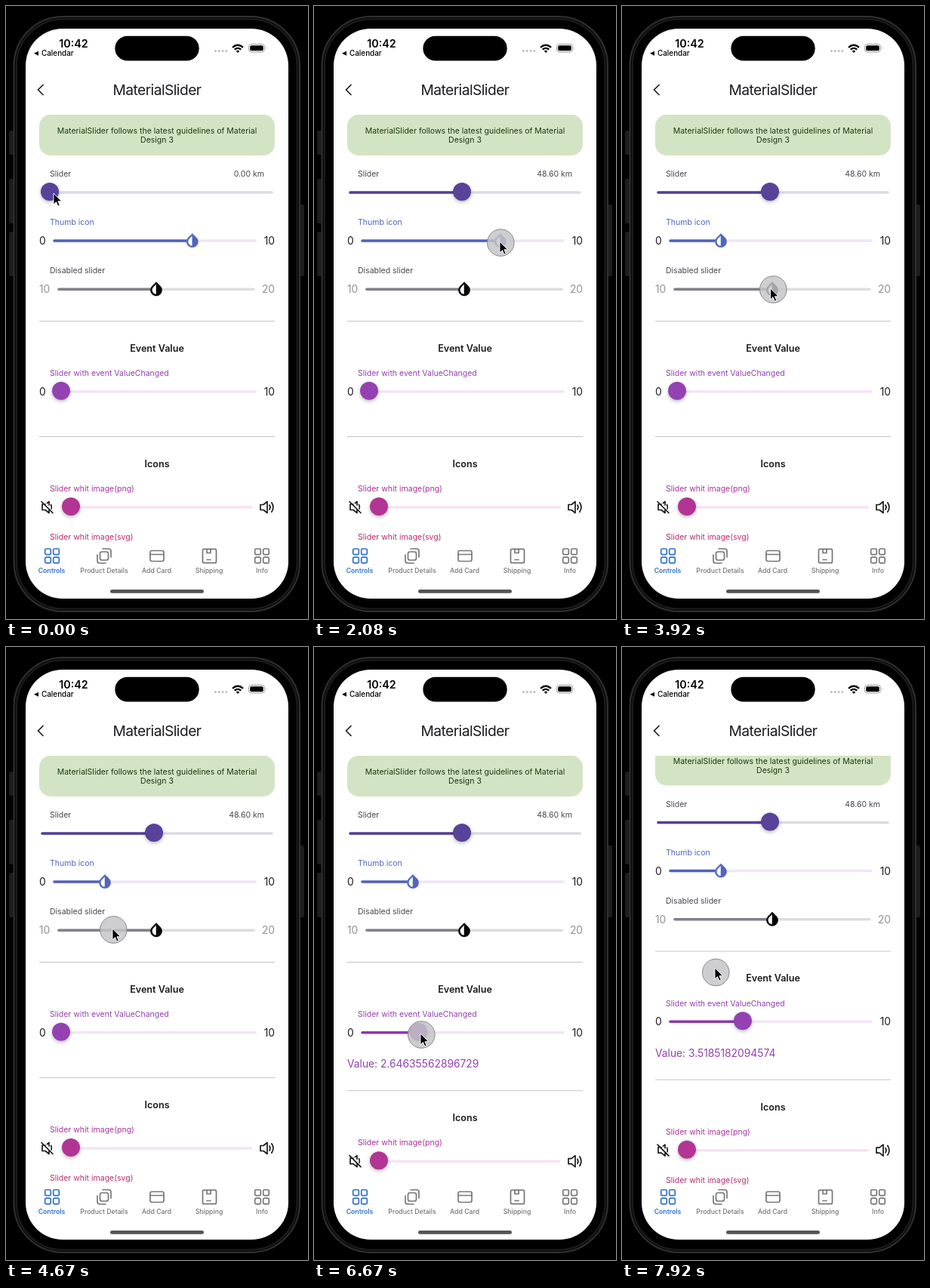
Recreate the animation shown at these times as an HTML page. Size 400 by 812 pixels, loop 8 s.

```html
<!DOCTYPE html>
<html lang="en">
<head>
<meta charset="utf-8">
<title>Slider demo</title>
<style>
  html, body { margin: 0; width: 100%; height: 100%; overflow: hidden; background: #000; }
  svg { display: block; width: 100vw; height: 100vh; font-family: Inter, Roboto, sans-serif; }
  .label { font-size: 10.5px; fill: #49454f; }
  .num { font-size: 13.8px; fill: #1d1b20; }
  .section { font-size: 12.6px; font-weight: 600; fill: #1a1a1a; }
  .tab { font-size: 8.7px; font-weight: 500; fill: #757575; }
  .mid { text-anchor: middle; }
  .end { text-anchor: end; }
  .track { stroke-width: 3.6; stroke-linecap: round; }
  .knob { filter: drop-shadow(0 2px 2.5px #0004); }
  .line { fill: none; stroke-width: 1.7; stroke-linejoin: round; stroke-linecap: round; }
  .rule { stroke: #c6c5c8; }
</style>
</head>
<body>
<svg viewBox="0 0 400 812">
  <defs>
    <clipPath id="view"><rect x="26" y="144" width="348" height="568"/></clipPath>
    <g id="grid">
      <rect x="-9.3" y="-9.5" width="7.6" height="7.6" rx="1.6"/>
      <rect x="1.7" y="-9.5" width="7.6" height="7.6" rx="1.6"/>
      <rect x="-9.3" y="1.7" width="7.6" height="7.6" rx="1.6"/>
      <rect x="1.7" y="1.7" width="7.6" height="7.6" rx="1.6"/>
    </g>
    <g id="drop" transform="scale(.95) translate(-12 -12.4)">
      <path d="M12 2.3 6.3 7.9a8 8 0 1 0 11.4 0Z" fill="#fff"/>
      <path fill="currentColor" stroke="currentColor" stroke-width=".5" d="M17.66 7.93 12 2.27 6.34 7.93c-3.12 3.12-3.12 8.19 0 11.31C7.9 20.8 9.95 21.58 12 21.58s4.1-.78 5.66-2.34c3.12-3.12 3.12-8.19 0-11.31zM12 19.59c-1.6 0-3.11-.62-4.24-1.76a6 6 0 0 1 0-8.48L12 5.1z"/>
    </g>
  </defs>

  <!-- phone body -->
  <g fill="#1d1d1e">
    <rect x="4" y="165" width="8" height="32" rx="2"/>
    <rect x="4" y="229" width="8" height="59" rx="2"/>
    <rect x="4" y="299" width="8" height="59" rx="2"/>
    <rect x="388" y="263" width="7" height="95" rx="2"/>
  </g>
  <rect x="10.5" y="14" width="378.5" height="788" rx="65" fill="#0b0b0b" stroke="#303031" stroke-width="2"/>
  <rect x="14" y="17.5" width="371.5" height="781" rx="61.5" fill="#000" stroke="#1c1c1d" stroke-width="2"/>
  <rect x="26" y="30" width="348" height="755" rx="49" fill="#fff"/>

  <!-- scrolling page -->
  <g clip-path="url(#view)">
    <g id="page">
      <rect x="44" y="144" width="312" height="54" rx="15" fill="#d3e4c5"/>
      <g class="label mid" style="fill:#1b3a0c">
        <text x="200" y="169">MaterialSlider follows the latest guidelines of Material</text>
        <text x="200" y="181">Design 3</text>
      </g>

      <text class="label" x="58" y="226">Slider</text>
      <text class="label end" x="342" y="226" id="distance"></text>
      <g id="plain"></g>

      <text class="label" x="58" y="290" style="fill:#5163b8">Thumb icon</text>
      <text class="num" x="44" y="316">0</text>
      <text class="num end" x="356" y="316">10</text>
      <g id="icon"></g>

      <text class="label" x="58" y="354">Disabled slider</text>
      <g class="num" style="fill:#929095">
        <text x="44" y="380">10</text>
        <text class="end" x="356" y="380">20</text>
      </g>
      <g id="disabled"></g>

      <path class="rule" d="M44 417.5H356"/>
      <text class="section mid" x="200" y="457.5">Event Value</text>
      <text class="label" x="58" y="490" style="fill:#9340ae">Slider with event ValueChanged</text>
      <text class="num" x="44" y="515.5">0</text>
      <text class="num end" x="356" y="515.5">10</text>
      <g id="event"></g>
      <text class="num" x="44" y="557" id="value" style="fill:#9340ae"></text>

      <g id="lower">
        <path class="rule" d="M44 570.5H356"/>
        <text class="section mid" x="200" y="611">Icons</text>
        <text class="label" x="58" y="643" style="fill:#ab3199">Slider whit image(png)</text>
        <g class="line" stroke="#1b1b1b">
          <path d="M52 660H48V667.5H52L57 671.5V667M54.5 658.5 57 656.5V661M47 656.5 62 671.5M59.5 660.5Q61 663.5 60 666"/>
          <path d="M337 660.5H341L346 656.5V671.5L341 667.5H337ZM349 661Q350.8 664 349 667M351.8 657.8Q356 664 351.8 670.2"/>
        </g>
        <g id="png"></g>
        <text class="label" x="58" y="707" style="fill:#b52c6e">Slider whit image(svg)</text>
      </g>
    </g>
  </g>

  <!-- status bar and title -->
  <rect x="144.4" y="39.8" width="111.3" height="32.8" rx="16.4"/>
  <text class="mid" x="89.5" y="54.5" font-size="14.3" font-weight="600">10:42</text>
  <path d="M37 62.8 43 59.8V65.8Z"/>
  <text x="47" y="66.3" font-size="9.9" font-weight="500">Calendar</text>
  <path d="M277.5 59.5H293" stroke="#bdbdbd" stroke-width="3" stroke-linecap="round" stroke-dasharray="0 4.8"/>
  <g fill="none" stroke="#000" stroke-width="2.3">
    <path d="M300 54.8Q307 48.6 314 54.8M302.7 57.7Q307 54 311.3 57.7"/>
    <path d="M307 62 304.7 59.7Q307 58 309.3 59.7Z" fill="#000" stroke="none"/>
  </g>
  <rect x="321.5" y="50.5" width="21" height="10.5" rx="3.3" fill="none" stroke="#9c9c9c"/>
  <rect x="323.2" y="52.2" width="17.6" height="7.1" rx="1.9"/>
  <path d="M344 54V57.5Q345.5 55.8 344 54Z" fill="#9c9c9c"/>
  <path class="line" d="M49 104.5 42.5 111 49 117.5" stroke="#1b1b1b"/>
  <text class="mid" x="200" y="118" font-size="19.2" letter-spacing="-.55" fill="#1c1b1f">MaterialSlider</text>

  <!-- tab bar -->
  <g class="line" stroke="#777">
    <use href="#grid" x="61" y="728.5" stroke="#2f73c6"/>
    <use href="#grid" x="339" y="728.5"/>
    <rect x="124.5" y="723" width="11" height="11" rx="2.5"/>
    <path d="M128 719H136A3 3 0 0 1 139 722V730M121 727V735A3 3 0 0 0 124 738H132"/>
    <rect x="191" y="721.5" width="18" height="14" rx="2.2"/>
    <path d="M191 726.5H209"/>
    <rect x="260.5" y="719.3" width="18" height="18.4" rx="2"/>
    <path d="M266 719.5V724.5H271V719.5M266 733.5H271"/>
  </g>
  <g class="tab mid">
    <text x="60.5" y="751" style="fill:#2f73c6;font-weight:600">Controls</text>
    <text x="130" y="751">Product Details</text>
    <text x="199.5" y="751">Add Card</text>
    <text x="269" y="751">Shipping</text>
    <text x="339" y="751">Info</text>
  </g>
  <rect x="138" y="773" width="124" height="4.8" rx="2.4" fill="#545456"/>

  <!-- pointer -->
  <circle id="touch" r="17.8" fill="#c5c5c7" fill-opacity=".83" stroke="#89898b"/>
  <path id="cursor" d="M0 0V14.8L3.5 11.6 5.8 17 8.2 16 5.9 10.7H10.6Z" stroke="#fff" stroke-width=".9"/>
</svg>

<script>
const $ = id => document.getElementById(id);
const TICKS_PER_SECOND = 12, LOOP_TICKS = 96;
const move = (el, x, y) => el.setAttribute('transform', `translate(${x} ${y})`);

// Fills a slider group and returns a function that places its thumb.
function slider(id, { y, from, to, active, rest, thumb, drop }) {
  const shape = drop
    ? `<use href="#drop" color="${thumb}"/>`
    : `<circle class="knob" r="12" fill="${thumb}"/>`;
  $(id).innerHTML = `
    <path class="track" d="M${from + 2} ${y}H${to - 2}" stroke="${rest}"/>
    <line class="track" x1="${from + 2}" x2="${from + 2}" y1="${y}" y2="${y}" stroke="${active}"/>
    <g>${shape}</g>`;
  const [, bar, knob] = $(id).children;
  return x => {
    bar.setAttribute('x2', x);
    move(knob, x, drop ? y : y - 1);
  };
}

const setPlain = slider('plain', { y: 247, from: 46, to: 354, active: '#553f98', rest: '#dddbe1', thumb: '#58429a' });
const setIcon = slider('icon', { y: 311, from: 62, to: 332, active: '#5061bb', rest: '#f0e5f5', thumb: '#5364bd', drop: true });
const setDisabled = slider('disabled', { y: 375.2, from: 68, to: 330, active: '#828086', rest: '#dddcdf', thumb: '#000', drop: true });
const setEvent = slider('event', { y: 510.8, from: 62, to: 332, active: '#8c3bab', rest: '#f3e5f6', thumb: '#9441b2' });
const setPng = slider('png', { y: 664, from: 74, to: 327, active: '#b13596', rest: '#f6e3f5', thumb: '#b23595' });
setDisabled(199);
setPng(86);

// Keys are [tick, ...values], eased between neighbours.
function at(keys, tick) {
  const next = keys.findIndex(key => key[0] > tick);
  if (next < 0) return keys[keys.length - 1].slice(1);
  if (next === 0) return keys[0].slice(1);
  const a = keys[next - 1], b = keys[next];
  const u = (tick - a[0]) / (b[0] - a[0]), eased = u * u * (3 - 2 * u);
  return a.slice(1).map((v, i) => v + (b[i + 1] - v) * eased);
}

const pointer = [
  [0, 63, 248], [4, 63, 248], [16, 201, 248], [18, 201, 248],
  [24, 246, 312], [26, 246, 312], [36, 131, 309], [38, 131, 309],
  [44, 199, 374], [46, 199, 374], [54, 141, 373], [59, 141, 373],
  [69, 79, 504], [72, 79, 504], [79, 141, 512], [80, 141, 512], [85, 162.5, 512], [86, 162.5, 512],
  [90, 123, 452], [91, 123, 452], [94, 123, 429.5], [95, 123, 425], [96, 123, 421]
];
const presses = [[3, 17], [24, 37], [45, 59], [71, 86], [91, 96]];
const distance = [[4, 0], [16, 48.6]];
const iconX = [[26, 246.8], [36, 131]];
const eventValue = [[71, 0], [72, .13], [79, 2.64635562896729], [80, 2.64635562896729], [85, 3.5185182094574]];
const scroll = [[92, 0], [94, 10], [95, 14.5], [96, 18.5]];

function draw(tick) {
  const [km] = at(distance, tick);
  setPlain(58 + km * 2.84);
  $('distance').textContent = km.toFixed(2) + ' km';
  setIcon(at(iconX, tick)[0]);

  // The value line appears one tick after the thumb first moves.
  const [value] = at(eventValue, tick);
  const shown = at(eventValue, tick - 1)[0] > 0;
  setEvent(73 + value * 24.7);
  $('value').textContent = shown ? 'Value: ' + Number(value.toPrecision(15)) : '';
  move($('lower'), 0, shown ? 17.2 : 0);
  move($('page'), 0, -at(scroll, tick)[0]);

  // The touch mark trails the arrow by one tick.
  const [touchX, touchY] = at(pointer, tick - 1);
  move($('cursor'), ...at(pointer, tick));
  move($('touch'), touchX + 1.3, touchY + 1.5);
  const pressed = presses.some(([down, up]) => tick >= down && tick < up);
  $('touch').style.display = pressed ? '' : 'none';
}

const start = performance.now();
function frame() {
  const elapsed = (performance.now() - start) / 1000;
  draw(Math.floor(elapsed * TICKS_PER_SECOND + .05) % LOOP_TICKS);
  requestAnimationFrame(frame);
}
frame();
</script>
</body>
</html>
```
